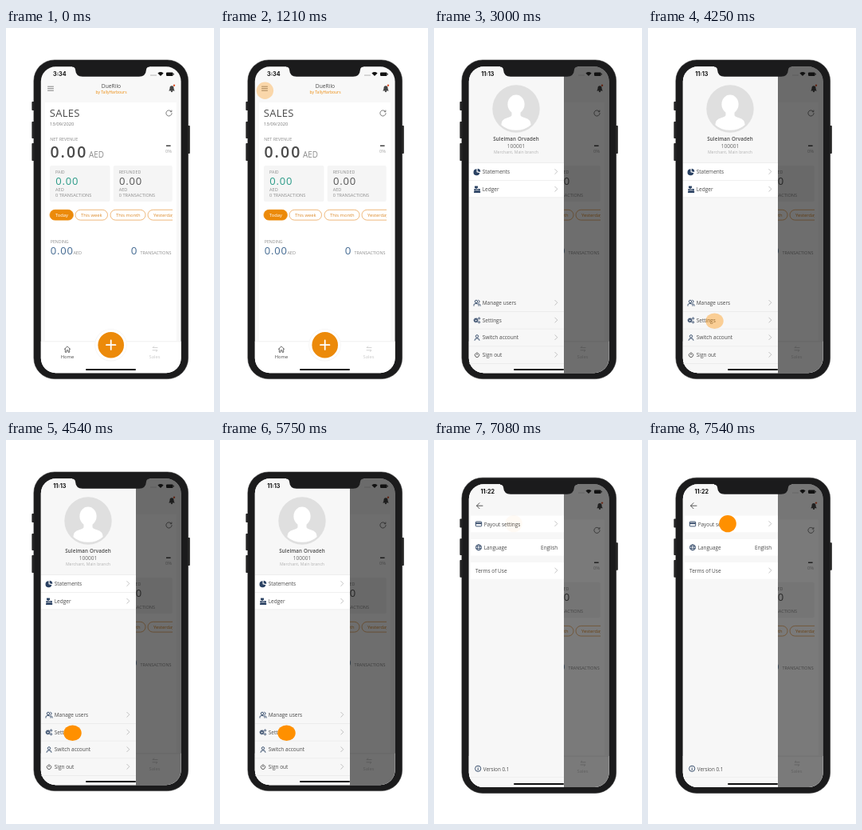
Recreate the animation shown at these times as an HTML page. Size 261 px wide and 480 px high, loop 8 s.

```html
<!DOCTYPE html>
<html lang="en">
<head>
<meta charset="utf-8">
<title>Payment app walkthrough</title>
<style>
html, body { margin: 0; width: 100%; height: 100%; overflow: hidden; background: #fff; }
svg { display: block; width: 100%; height: 100%; font-family: "Open Sans", "Noto Sans", sans-serif; }
.ln { fill: none; stroke-linecap: round; stroke-linejoin: round; }
</style>
</head>
<body>
<svg id="stage" viewBox="0 0 261 480" xmlns="http://www.w3.org/2000/svg"></svg>
<script>
const LOOP = 8000;
const FADE_START = 1060, FADE_TIME = 480;
const SCENES = [
  { start: 0, clock: '3:34', dim: 0, phone: '', tap: { cx: 56.4, cy: 78.3, rx: 10.7, ry: 10.7 } },
  { start: 3000, clock: '11:13', dim: 0.57, phone: '', tap: { cx: 83.5, cy: 366.3, rx: 11.2, ry: 9.8 } },
  { start: 6000, clock: '11:22', dim: 0.52, phone: 'matrix(1 0 0 .989 0 7.6)',
    tap: { cx: 100, cy: 104.6, rx: 10.8, ry: 10.7 } }
];
const ORANGE = '#ec8a0a', NAVY = '#2b4263', INK = '#4a4a4a', GREY = '#8b8b8b', BODY = '#1b1b1c';

const text = (s, x, y, size, fill = INK, extra = '') =>
  `<text x="${x}" y="${y}" font-size="${size}" fill="${fill}" ${extra}>${s}</text>`;
const rect = (x, y, w, h, fill, extra = '') =>
  `<rect x="${x}" y="${y}" width="${w}" height="${h}" fill="${fill}" ${extra}/>`;
const circle = (x, y, r, fill, extra = '') =>
  `<circle cx="${x}" cy="${y}" r="${r}" fill="${fill}" ${extra}/>`;
const line = (d, color, w = 0.9) =>
  `<path class="ln" d="${d}" stroke="${color}" stroke-width="${w}"/>`;
const at = (x, y, body) => `<g transform="translate(${x} ${y})">${body}</g>`;
const chevron = (x, y) => line(`M${x - 1.5} ${y - 3}l3 3l-3 3`, '#b4b4b4', 0.8);
const rule = y => rect(44, y, 119, 0.6, '#e7e7e7');
const MID = 'text-anchor="middle"', END = 'text-anchor="end"';

const gear = (r, teeth) =>
  circle(0, 0, r, 'none', `stroke="${NAVY}" stroke-width="${r * 0.8}"`) +
  circle(0, 0, r * 1.5, 'none', `stroke="${NAVY}" stroke-width="${r * 0.6}"
    pathLength="${teeth * 2}" stroke-dasharray="1"`);

const icons = {
  pie: `<path d="M-.5 -3.6A4 4 0 1 0 3.4 1.4L-.5 .4Z" fill="${NAVY}"/>
    <path d="M.7 -4A4 4 0 0 1 4.2 .3L.7 -.6Z" fill="${NAVY}"/>`,
  register: rect(-3, -4, 4, 2.4, NAVY) + rect(-1.6, -2, 1.2, 2, NAVY) +
    rect(-3.6, -.6, 7.4, 2.8, NAVY, 'rx=".5"') + rect(-4, 2.4, 8.2, 2, NAVY, 'rx=".4"') +
    rect(-2.2, .2, 4.4, .7, '#fff'),
  users: circle(-1, -1.7, 1.7, 'none', `stroke="${NAVY}" stroke-width=".9"`) +
    line('M-4 3.6V2.6Q-4 1-2.2 1H.2Q2 1 2 2.6V3.6M1.8-3.4A1.7 1.7 0 0 1 1.8-.1M2.8 1.1Q4.2 1.4 4.2 3.6', NAVY),
  gears: at(-1.4, 0, gear(1.7, 8)) + at(2.6, -2.4, gear(0.9, 6)) + at(2.6, 2.4, gear(0.9, 6)),
  user: circle(0, -1.6, 1.7, 'none', `stroke="${NAVY}" stroke-width=".9"`) +
    line('M-3 3.4Q-3 .9 0 .9T3 3.4', NAVY),
  power: line('M-1.7-1.9A2.7 2.7 0 1 0 1.7-1.9M0-3V0', INK),
  card: rect(-3.7, -2.9, 7.4, 5.8, 'none', `rx=".8" stroke="${NAVY}" stroke-width=".9"`) +
    rect(-3.7, -1.6, 7.4, 1.7, NAVY),
  globe: circle(0, 0, 3.5, 'none', `stroke="${NAVY}" stroke-width=".9"`) +
    `<ellipse rx="1.6" ry="3.5" fill="none" stroke="${NAVY}" stroke-width=".7"/>` +
    line('M-3.2-1.2H3.2M-3.2 1.2H3.2', NAVY, 0.7),
  info: circle(0, 0, 3.6, 'none', `stroke="${NAVY}" stroke-width=".9"`) +
    line('M0-.3V1.8M0-1.8V-1.7', NAVY)
};

const amount = (x, y, color) => text('0.00', x, y, 13, color, 'letter-spacing=".8"');

const card = (x, w, label, color) =>
  rect(x, 172, w, 45, '#f5f5f5', 'rx="2"') +
  at(x + 7.1, 0, text(label, 0, 182, 5.3, GREY) + amount(0.2, 195.9, color) +
    text('AED', 0, 204, 5.5, GREY) + text('0 TRANSACTIONS', 0, 211, 5.6, GREY));

const chip = (x, w, label, on) =>
  rect(x, 227.3, w, 12.8, on ? ORANGE : '#fff', `rx="6.4" stroke="${on ? ORANGE : '#eba65a'}" stroke-width=".8"`) +
  text(label, x + 7, 235.9, 5.8, on ? '#fff' : '#dc8a2a');

const dashboard = () =>
  rect(40, 44, 184, 392, '#f8f8f8') +
  rect(49, 93, 164.8, 298, '#fff') +
  rect(40, 392, 184, 44, '#fff') +
  line('M52.5 73.2H59.5M52.5 75.7H59.5M52.5 78.2H59.5', '#666', 0.8) +
  text('DueRilo', 132, 75.2, 6.7, INK, MID) +
  text('by TallyHarbours', 132, 82, 5, ORANGE, MID) +
  at(208, 76, '<path d="M-3.8 2.4Q-2.5 1.3-2.5-1A2.5 2.7 0 0 1 2.5-1Q2.5 1.3 3.8 2.4Z" fill="#444"/>' +
    circle(0, 3.2, 1.1, '#444') + circle(3, -4.2, 1.2, '#e0552e')) +
  text('SALES', 54.8, 111.2, 13, INK, 'letter-spacing=".25"') +
  text('13/09/2020', 55, 121.8, 5.7, '#777') +
  line('M207.4 104.3A3.6 3.6 0 1 0 208.1 106.6M207.9 103V104.7H206.2', '#555', 0.75) +
  text('NET REVENUE', 55.2, 141, 5.4, GREY) +
  text('0.00', 55.4, 161.5, 19.4, INK, 'font-weight="600" letter-spacing="2.1"') +
  text('AED', 104, 161.5, 9.9, GREY) +
  rect(201, 146.5, 5.6, 1.5, '#444') +
  text('0%', 200, 156, 5.7, '#a5a5a5') +
  card(55, 75.5, 'PAID', '#2c9b88') +
  card(134.7, 74, 'REFUNDED', '#555') +
  '<g clip-path="url(#chips)">' + chip(55, 29.4, 'Today', true) + chip(87, 40.5, 'This week') +
  chip(131, 44, 'This month') + chip(178, 42, 'Yesterday') + '</g>' +
  text('PENDING', 55.8, 269, 5.2, GREY) + amount(55.8, 283.2, '#456b93') +
  text('AED', 84.4, 283, 5.5, GREY) +
  text('0', 156.7, 283.2, 13.4, '#456b93') +
  text('TRANSACTIONS', 207.6, 283, 5.4, GREY, END) +
  rect(40, 391.6, 184, 0.7, '#eee') +
  line('M73.3 401.5L77 397.8L80.7 401.5M74.3 400.8V405.3H76V402.8H78V405.3H79.7V400.8', '#444', 0.75) +
  text('Home', 77, 413.4, 5.8, INK, MID) +
  line('M190 399.6H184L185.6 398M184 402.8H190L188.4 404.4', '#c6c6c6', 0.8) +
  text('Sales', 186.5, 413.4, 5.8, '#cacaca', MID) +
  circle(131.5, 396.3, 20.2, '#f3f3f3') + circle(131.5, 396.3, 19.5, '#fff') +
  circle(131.7, 396.2, 16.3, ORANGE) +
  line('M126 396.2H137.4M131.7 390.5V401.9', '#fff', 1.8);

const menuRow = (icon, label, y) =>
  at(54, y, icons[icon]) + text(label, 60.7, y + 2.4, 6.5) + chevron(153.3, y - 0.3);

const menu = () =>
  circle(103, 101, 29.7, '#dfdfdf') +
  `<g clip-path="url(#avatar)" fill="#fff"><ellipse cx="103" cy="95.3" rx="10.6" ry="11.8"/>
   <path d="M97.5 102H108.5V109Q109 111 114 112.3Q121.5 114.5 121.5 120V121.5Q114 127.8 103 127.8T84.5 121.5V120Q84.5 114.5 92 112.3Q97 111 97.5 109Z"/></g>` +
  text('Suleiman Orvadeh', 103, 141.2, 6.2, INK, MID + ' font-weight="600" letter-spacing=".15"') +
  text('100001', 103, 150.2, 6.6, '#666', MID) +
  text('Merchant, Main branch', 103, 157.2, 5.2, '#b3b3b3', MID) +
  rect(44, 168.6, 119, 43.2, '#fff') + [168.4, 190, 211.6].map(rule).join('') +
  menuRow('pie', 'Statements', 179.8) + menuRow('register', 'Ledger', 201.6) +
  menuRow('users', 'Manage users', 343.6) + menuRow('gears', 'Settings', 365.4) +
  menuRow('user', 'Switch account', 387) + menuRow('power', 'Sign out', 408.6) +
  [354.2, 375.8, 397.6, 419.2].map(rule).join('');

const settings = () =>
  line('M61 82.2H53.6M57 78.7L53.5 82.2L57 85.7', '#444', 0.9) +
  [94.5, 124, 153].map(y => rect(46, y, 117, 20.7, '#fff')).join('') +
  at(56, 105, icons.card) + text('Payout settings', 62.7, 107.6, 6.4) + chevron(153.3, 104.6) +
  at(56, 134.3, icons.globe) + text('Language', 62.7, 136.8, 6.4) +
  text('English', 155.3, 136.8, 6.4, INK, END) +
  text('Terms of Use', 52, 165.8, 6.5) + chevron(153.3, 163) +
  at(55.2, 410.8, icons.info) + text('Version 0.1', 61.8, 413.6, 6.3) +
  rect(46, 421, 117, 0.5, '#e7e7e7');

const statusBar = () =>
  text('', 67.3, 60, 7.2, '#111', `id="clock" ${MID} font-weight="700" style="font-family:Inter,sans-serif"`) +
  [182, 184, 186, 188].map(x => circle(x, 59, 0.5, '#444')).join('') +
  at(194, 60, '<path d="M0 0L-3.6-3.6Q0-6.4 3.6-3.6Z" fill="#111"/>') +
  rect(201, 55.4, 8.6, 4.6, '#111', 'rx="1.2"') + rect(210, 56.9, 0.8, 1.6, '#111');

const button = (x, y, h) => rect(x, y, 4, h, '#222', 'rx=".8"');
const body = () =>
  button(32.4, 92, 11) + button(32.4, 117, 21) + button(32.4, 144, 22) + button(226.8, 122, 35) +
  rect(34.9, 40, 193.7, 398.6, BODY, 'rx="26" stroke="#333" stroke-width=".6"');

const notch = `<path d="M83 47H180V48.6Q176.4 48.8 176 52Q175.4 60.8 167 60.8H96Q87.6 60.8 87 52Q86.6 48.8 83 48.6Z" fill="${BODY}"/>`;

const stage = document.getElementById('stage');
stage.innerHTML = `
  <defs>
    <clipPath id="screen"><rect x="43.8" y="48.3" width="175.8" height="382.9" rx="18.5"/></clipPath>
    <clipPath id="chips"><rect x="54" y="225" width="155" height="18"/></clipPath>
    <clipPath id="avatar"><circle cx="103" cy="101" r="27.5"/></clipPath>
  </defs>
  <g id="phone">${body()}
    <g clip-path="url(#screen)">${dashboard()}
      <g id="drawer">${rect(163, 44, 60, 392, '#000', 'id="shade"')}${rect(40, 44, 123, 392, '#f7f7f7')}</g>
      ${statusBar()}
      ${rect(100, 426, 63, 2, '#111', 'rx="1"')}
    </g>${notch}
  </g>
  <g id="menu">${menu()}</g>
  <g id="settings">${settings()}</g>
  <ellipse id="tap" fill="#ff9000"/>`;

const $ = id => document.getElementById(id);
const show = (id, on) => $(id).setAttribute('display', on ? 'inline' : 'none');
let current = -1;

function setScene(n) {
  const scene = SCENES[n];
  current = n;
  show('drawer', n > 0);
  show('menu', n === 1);
  show('settings', n === 2);
  $('clock').textContent = scene.clock;
  $('shade').setAttribute('opacity', scene.dim);
  $('phone').setAttribute('transform', scene.phone);
  for (const [key, value] of Object.entries(scene.tap)) $('tap').setAttribute(key, value);
}

function render(t) {
  const n = SCENES.filter(s => t >= s.start).length - 1;
  if (n !== current) setScene(n);
  const p = (t - SCENES[n].start - FADE_START) / FADE_TIME;
  $('tap').setAttribute('opacity', Math.min(1, Math.max(0, p)));
}

const start = performance.now();
function tick() {
  render(Math.max(0, performance.now() - start) % LOOP);
  requestAnimationFrame(tick);
}
tick();
</script>
</body>
</html>
```
